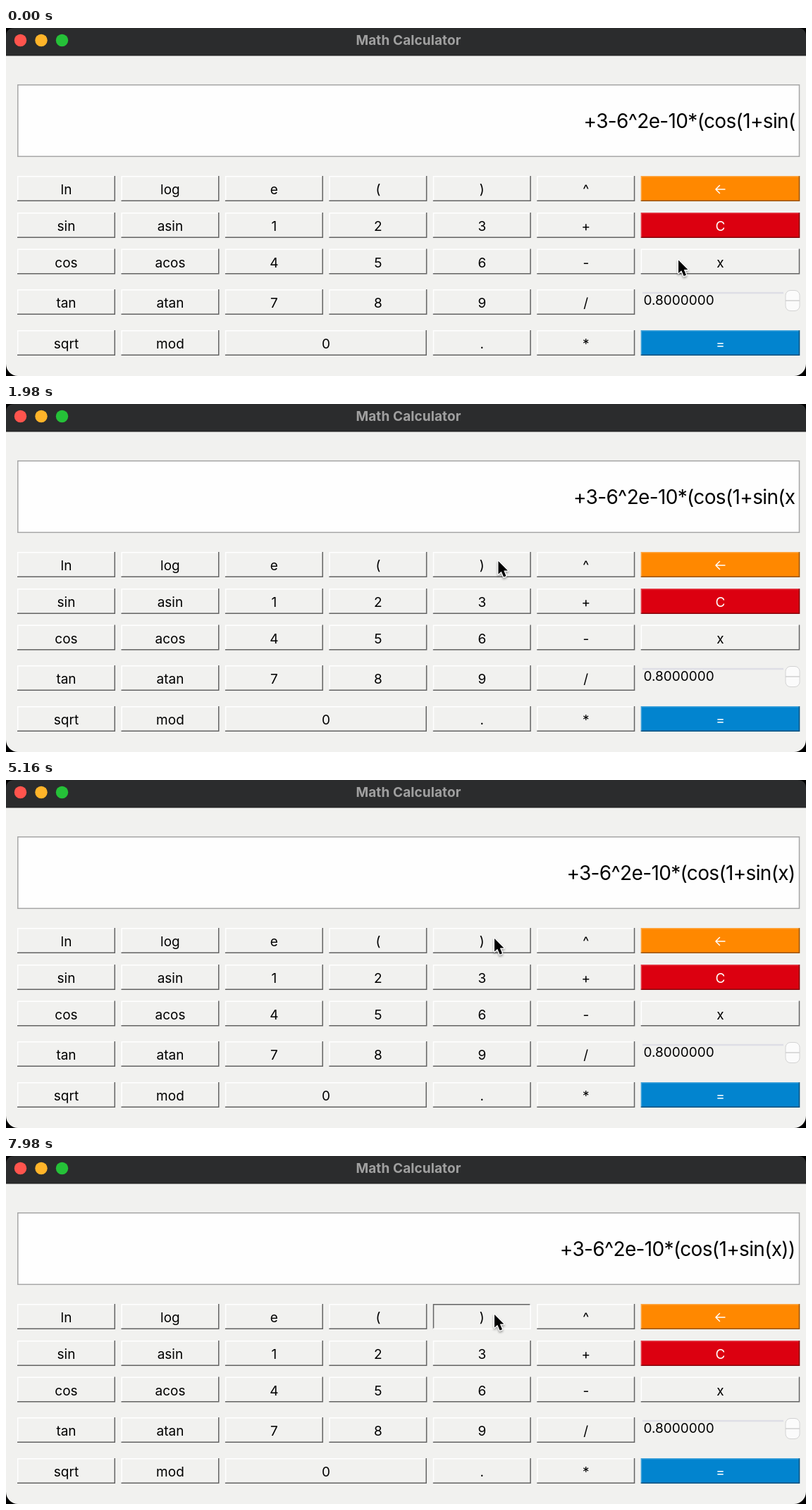
Animation of 1135 by 494 pixels, one loop 8 s. Source, as an HTML page:

```html
<!DOCTYPE html>
<html lang="en">
<head>
<meta charset="utf-8">
<title>Math Calculator</title>
<style>
  html, body { margin: 0; width: 100%; height: 100%; overflow: hidden; background: #000; }
  svg { display: block; width: 1135px; height: 494px; }
  text { font: 19px Inter, "Open Sans", sans-serif; font-feature-settings: "calt" 0; white-space: pre; }
  .key text { text-anchor: middle; }
  .key path { fill: none; stroke-width: 1.5; }
  #title { font-weight: 700; text-anchor: middle; letter-spacing: .1px; fill: #a0a0a0; }
  #entry { font-size: 28px; text-anchor: end; letter-spacing: -.65px; }
  #cursor { filter: drop-shadow(0 2px 1.5px rgba(0, 0, 0, .35)); }
</style>
</head>
<body>
<svg viewBox="0 0 1135 494">
  <rect width="1135" height="494"/>
  <rect width="1135" height="494" rx="17" fill="#f1f1ef"/>
  <path d="M0 39V12Q0 0 12 0H1123Q1135 0 1135 12V39Z" fill="#2b2c2d"/>
  <path d="M0 39H1135" stroke="#1c1c1c"/>
  <circle cx="20.5" cy="17.5" r="8.7" fill="#ff544d"/>
  <circle cx="50" cy="17.5" r="8.7" fill="#ffb429"/>
  <circle cx="79.5" cy="17.5" r="8.7" fill="#25c138"/>
  <text id="title" x="571" y="23.5">Math Calculator</text>

  <rect x="16.8" y="80.8" width="1108.7" height="101.5" fill="#fefefe" stroke="#a6a6a6" stroke-width="1.5"/>
  <text id="entry" x="1119.5" y="142"></text>

  <g id="keys"></g>

  <path d="M903 376H1103" stroke="#dedee6" stroke-width="2.5"/>
  <text x="904.5" y="393">0.8000000</text>
  <rect x="1106" y="372.5" width="20" height="29" rx="7" fill="#fbfbfb" stroke="#d3d3d3"/>
  <path d="M1106 387H1126" stroke="#cfcfcf" stroke-width="1.5"/>

  <path id="cursor" d="M0 0V18.6L4.3 14.8L7.6 22.6L11 21.2L7.8 13.6H13.4Z"
        stroke="#fff" stroke-width="2.6" stroke-linejoin="round" paint-order="stroke"/>
</svg>
<script>
const LOOP = 8000;
const rows = [
  [210, 'ln log e ( ) ^ ←'],
  [262, 'sin asin 1 2 3 + C'],
  [313.5, 'cos acos 4 5 6 - x'],
  [371, 'tan atan 7 8 9 /'],
  [429, 'sqrt mod 0 . * =']
];
const colors = { '←': '#ff8800', C: '#dc0010', '=': '#0284cf' };
const keys = {};

const make = (parent, tag, attrs) => {
  const el = document.createElementNS('http://www.w3.org/2000/svg', tag);
  for (const name in attrs) el.setAttribute(name, attrs[name]);
  return parent.appendChild(el);
};

function addKey(label, x, y, w) {
  const h = 36, fill = colors[label];
  const g = make(document.getElementById('keys'), 'g', { class: 'key' });
  if (fill) make(g, 'rect', { x, y, width: w, height: h, fill });
  const light = make(g, 'path', { d: `M${x + .7} ${y + h}V${y + .7}H${x + w}` });
  const dark = make(g, 'path', { d: `M${x} ${y + h - .7}H${x + w - .7}V${y}` });
  const cx = x + w / 2;
  if (label === '←') {
    make(g, 'path', {
      d: `M${cx + 6.5} ${y + 19}h-13m5.5 -5.5l-5.5 5.5l5.5 5.5`,
      stroke: '#fff', 'stroke-linecap': 'round', 'stroke-linejoin': 'round'
    });
  } else {
    make(g, 'text', { x: cx, y: y + 26, fill: fill ? '#fff' : '#000' }).textContent = label;
  }
  keys[label] = down => {
    const hi = fill ? 'rgba(255,255,255,.25)' : '#fff';
    const lo = fill ? 'rgba(0,0,0,.4)' : '#636363';
    light.setAttribute('stroke', down ? lo : hi);
    dark.setAttribute('stroke', down ? hi : lo);
  };
  keys[label](false);
}

for (const [y, labels] of rows) {
  let col = 0;
  for (const label of labels.split(' ')) {
    const x = 16 + 147.45 * col;
    const w = label === '0' ? 286 : col === 6 ? 225.5 : 139;
    addKey(label, x, y, w);
    col += label === '0' ? 2 : 1;
  }
}

// Clicks: key, press time, release time; the character appears on release.
const clicks = [['x', 100, 240], [')', 4960, 5120], [')', 6560, 6720], [')', 7860, 8020]];

// Cursor path: time, x, y
const path = [
  [0, 954, 329.5], [400, 954, 329.5], [820, 861, 250.5],
  [1520, 717, 219.5], [1980, 698.5, 223], [2400, 693, 225], [LOOP, 693, 225]
];

const slope = (i, k) => (path[i + 1][k] - path[i][k]) / (path[i + 1][0] - path[i][0]);

function velocity(i, k) {
  if (i === 0 || i === path.length - 1) return 0;
  const a = slope(i - 1, k), b = slope(i, k);
  return a * b > 0 ? 2 * a * b / (a + b) : 0;
}

// Monotone cubic interpolation along the path
function position(t, k) {
  let i = 0;
  while (i < path.length - 2 && t >= path[i + 1][0]) i++;
  const span = path[i + 1][0] - path[i][0], u = (t - path[i][0]) / span;
  const ease = u * u * (3 - 2 * u);
  return path[i][k] + (path[i + 1][k] - path[i][k]) * ease
    + span * u * (1 - u) * (velocity(i, k) * (1 - u) - velocity(i + 1, k) * u);
}

const entry = document.getElementById('entry');
const cursor = document.getElementById('cursor');

function draw(now) {
  const t = now % LOOP;
  let text = '+3-6^2e-10*(cos(1+sin(';
  const down = { x: false, ')': false };
  for (const [key, press, release] of clicks) {
    if (t >= release) text += key;
    else if (t >= press) down[key] = true;
  }
  for (const key in down) keys[key](down[key]);
  if (entry.textContent !== text) entry.textContent = text;
  cursor.setAttribute('transform', `translate(${position(t, 1)} ${position(t, 2)})`);
}

const start = performance.now();
function tick() {
  draw(performance.now() - start);
  requestAnimationFrame(tick);
}
tick();
</script>
</body>
</html>
```
